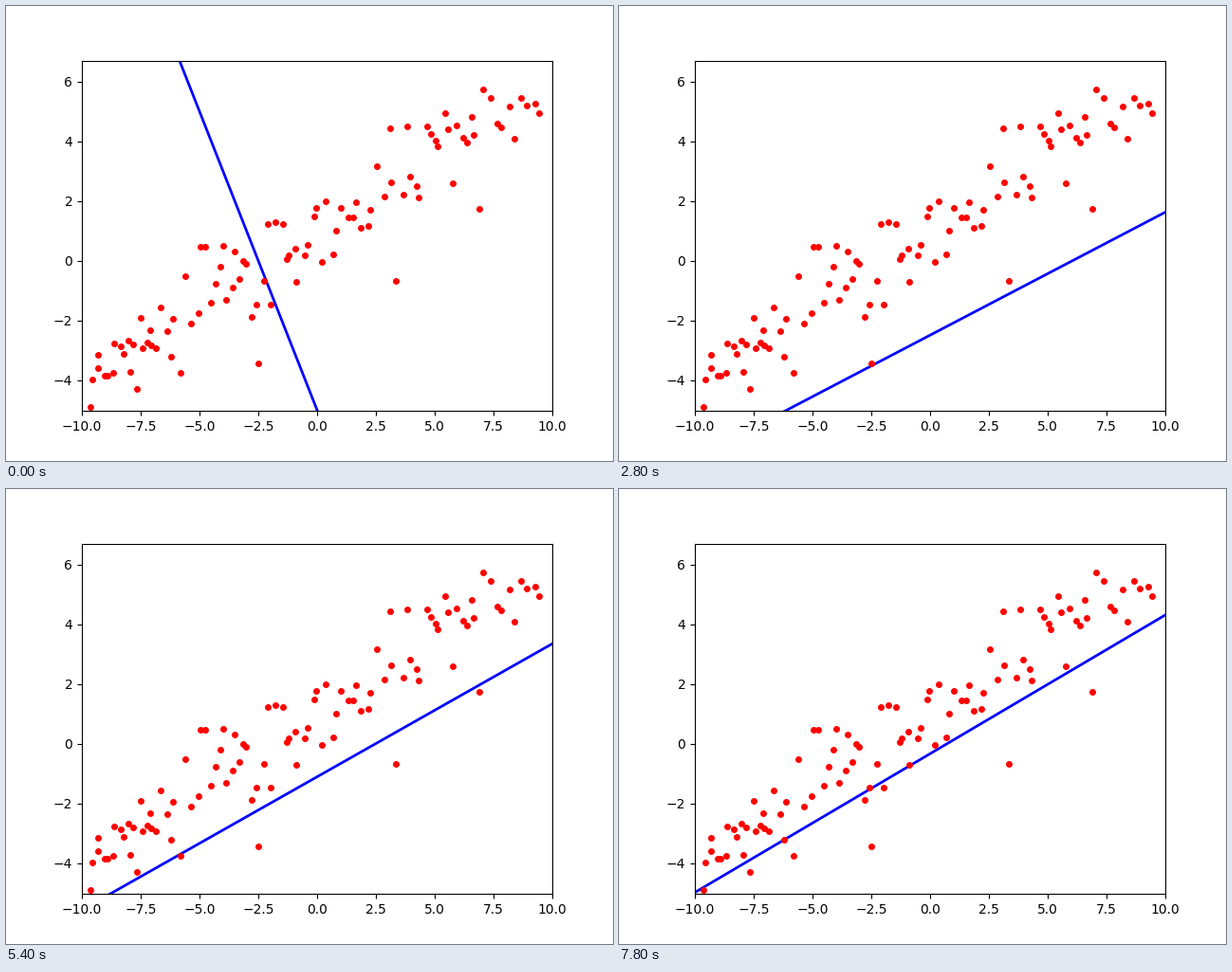
A matplotlib script for the animation above (8000 ms loop, 640 by 480 pixels).

```python
import numpy as np
import matplotlib.pyplot as plt
from matplotlib.animation import FuncAnimation

COUNT = 100
STEPS = 40
RATE = 0.04
X_LIM = (-10, 10)
Y_LIM = (-5.03, 6.70)
TREND = (0.495, 0.918)  # slope and intercept of the best fit


def make_points(rng):
    """Noisy points whose least-squares fit is exactly TREND."""
    # Spread the points evenly through the deciles of x
    deciles = [-9.8, -8.15, -6.8, -4.6, -2.9, -1.1, 0.9, 3.1, 5.1, 7.0, 9.5]
    rank = (np.arange(COUNT) + rng.uniform(0, 1, COUNT)) / COUNT
    x = np.interp(rank, np.linspace(0, 1, len(deciles)), deciles)
    x = -0.747 + 5.57 * (x - x.mean()) / x.std()

    # The scatter narrows towards both ends
    noise = rng.normal(0, 1, COUNT) * (1.25 - 0.055 * np.abs(x))
    noise -= np.polyval(np.polyfit(x, noise, 1), x)
    return x, np.polyval(TREND, x) + noise


def descend(slope, bias):
    """Gradient descent on the squared error, one (slope, bias) per step."""
    path = []
    for _ in range(STEPS):
        path.append((slope, bias))
        err = slope * xs + bias - ys
        slope -= RATE * np.mean(err * xs)
        bias -= RATE * np.mean(err)
    return path


xs, ys = make_points(np.random.default_rng(4))
path = descend(-2.0, -5.0)

fig, ax = plt.subplots(figsize=(6.4, 4.8), dpi=100)
ax.set_xlim(X_LIM)
ax.set_ylim(Y_LIM)
line, = ax.plot([], [], color="blue", lw=2)
ax.plot(xs, ys, "ro", ms=4)
ends = np.array(X_LIM)


def update(i):
    line.set_data(ends, np.polyval(path[i], ends))
    return line,


anim = FuncAnimation(fig, update, frames=STEPS, interval=200,
                     init_func=lambda: update(0), repeat=True, repeat_delay=0)
plt.show()
```
